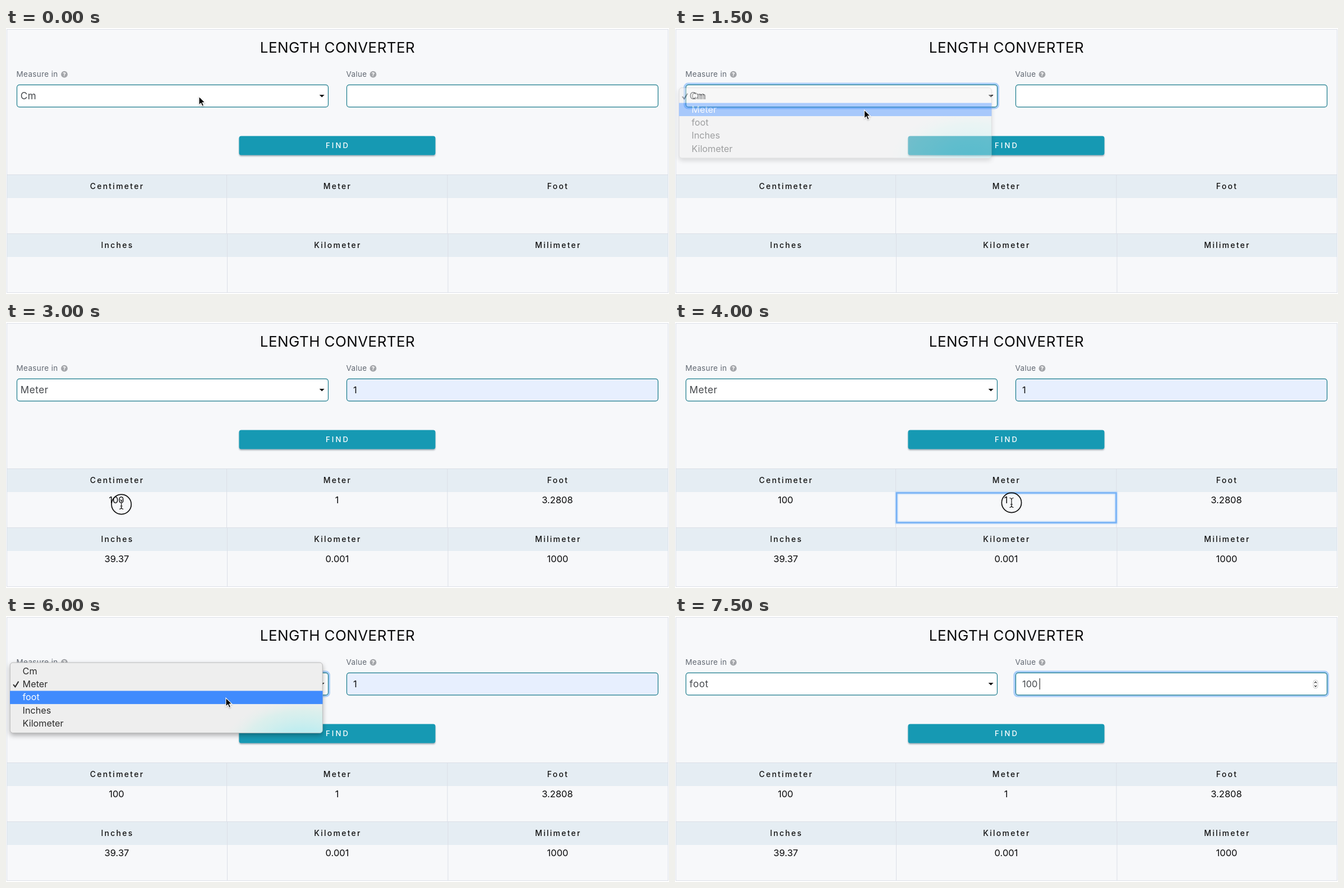
Animation of 1182x474 px, one loop 8 s. Source, as an HTML page:

```html
<!DOCTYPE html>
<html lang="en">
<head>
<meta charset="utf-8">
<title>Length converter</title>
<style>
  html, body { margin: 0; width: 100%; height: 100%; overflow: hidden; background: #fff; }
  svg { display: block; width: 100%; height: 100%; font-family: Inter, "Open Sans", sans-serif; }
  .title { font-size: 26px; letter-spacing: .4px; fill: #0b0b0c; }
  .label { font-size: 13.5px; letter-spacing: .35px; fill: #626973; }
  .help { font-size: 9.5px; font-weight: 800; fill: #fff; }
  .field { font-size: 17px; letter-spacing: .6px; fill: #45484c; }
  .number { font-size: 16.5px; fill: #45484c; }
  .dark { fill: #0b0b0c; }
  .find { font-size: 13.2px; font-weight: 500; letter-spacing: 3px; fill: #fff; }
  .head { font-size: 14px; font-weight: 500; letter-spacing: 2.25px; fill: #111; }
  .item { font-size: 16.2px; fill: #2b2b2b; }
  .hot { fill: #fff; }
  .mid { text-anchor: middle; }
  .line { stroke: #dbdfe7; fill: none; }
  .box { stroke: #17798a; stroke-width: 1.2; }
  .ring { fill: none; stroke: #abcff9; stroke-width: 3.6; }
</style>
</head>
<body>
<svg viewBox="0 0 1182 474" preserveAspectRatio="none">
  <defs>
    <radialGradient id="tint" gradientUnits="userSpaceOnUse" cx="0" cy="0" r="1"
      gradientTransform="translate(530 238) scale(146 92)">
      <stop offset="0" stop-color="#aeeaf2"/>
      <stop offset=".4" stop-color="#bcedf0" stop-opacity=".9"/>
      <stop offset=".75" stop-color="#d2f0ec" stop-opacity=".65"/>
      <stop offset="1" stop-color="#e6efed" stop-opacity="0"/>
    </radialGradient>
    <filter id="menuShadow" x="-5%" y="-10%" width="110%" height="130%">
      <feDropShadow dx="0" dy="4" stdDeviation="4" flood-color="#000" flood-opacity=".3"/>
    </filter>
    <filter id="buttonShadow" x="-5%" y="-20%" width="110%" height="150%">
      <feDropShadow dx="0" dy="2" stdDeviation="1.3" flood-color="#20354a" flood-opacity=".4"/>
    </filter>
    <filter id="cursorShadow" x="-50%" y="-50%" width="200%" height="200%">
      <feDropShadow dx="0" dy="1" stdDeviation=".8" flood-color="#000" flood-opacity=".3"/>
    </filter>
    <filter id="soft" x="-5%" y="-20%" width="110%" height="140%">
      <feGaussianBlur stdDeviation="1"/>
    </filter>
  </defs>
  <g id="page"></g>
  <g id="live"></g>
</svg>
<script>
const page = document.getElementById('page');
const live = document.getElementById('live');
const STEP = 500;
const UNITS = ['Cm', 'Meter', 'foot', 'Inches', 'Kilometer'];
const HEADS = [['Centimeter', 'Meter', 'Foot'], ['Inches', 'Kilometer', 'Milimeter']];
const RESULTS = [['100', '1', '3.2808'], ['39.37', '0.001', '1000']];
const CENTERS = [197, 590, 983];
const CELL_EDGES = [1.5, 394, 787.5, 1180.5];

const text = (x, y, cls, str) => `<text x="${x}" y="${y}" class="${cls}">${str}</text>`;
const rect = (x, y, w, h, attrs) => `<rect x="${x}" y="${y}" width="${w}" height="${h}" ${attrs}/>`;
const path = (d, attrs) => `<path d="${d}" ${attrs}/>`;
const grid = (rows, draw) => rows.map((row, r) => row.map((s, c) => draw(s, c, r)).join('')).join('');

const help = x => `<circle cx="${x}" cy="82.7" r="5.9" fill="#a3a5a9"/>` + text(x, 86.2, 'help mid', '?');

function drawPage() {
  const bands = [261, 366].map((y, r) =>
    rect(2, y, 1178, 42, 'fill="#e5edf3"') +
    path(`M2 ${y + .5}H1180M${393.5 + r} ${y}V${y + 105}M${787 + r} ${y}V${y + 105}`, 'class="line"'));
  return rect(1.5, 2.5, 1179, 469, 'fill="#f7f8fa"') + bands.join('') +
    rect(1.5, 2.5, 1179, 469, 'class="line"') +
    text(591, 44, 'title mid', 'LENGTH CONVERTER') +
    text(18.5, 87.3, 'label', 'Measure in') + help(104) +
    text(606.5, 87.3, 'label', 'Value') + help(654.5) +
    rect(415.5, 192.5, 350, 34, 'rx="4" fill="#1599b3" filter="url(#buttonShadow)"') +
    text(591.5, 214, 'find mid', 'FIND') +
    grid(HEADS, (s, c, r) => text(CENTERS[c] + 1 + r * .5, 287.2 + 105 * r, 'head mid', s));
}

const input = (x, fill, focused) =>
  (focused ? rect(x - 1.8, 99.4, 559, 43.4, 'rx="6" class="ring"') : '') +
  rect(x + .5, 101.4, 555, 39.4, `rx="4.5" class="box" fill="${fill}"`);

function drawFields({ unit, focus, value, auto, caret, spin }) {
  let out = input(19, '#fff', focus === 'unit') + text(25.8, 126.8, 'field', unit) +
    path('M558.7 119h9l-4.5 4.6z', 'fill="#111"') +
    input(607, auto ? '#e7effe' : '#fff', focus === 'value');
  if (value) out += text(619, 126.8, 'number' + (auto ? ' dark' : ''), value);
  if (caret) out += path(`M${caret} 111V131`, 'stroke="#333" stroke-width="1.2"');
  if (spin) {
    out += rect(1138, 114, 8, 15, 'rx="4" fill="#fff" stroke="#bbb" stroke-width=".8"') +
      path('M1140 119.5l2-2.3 2 2.3M1140 123.7l2 2.3 2-2.3', 'fill="none" stroke="#333" stroke-width="1.2"');
  }
  return out;
}

function drawCellFocus(cell) {
  const x = CELL_EDGES[cell] + 1, w = CELL_EDGES[cell + 1] - CELL_EDGES[cell] - 2;
  return rect(x, 304.5, w, 53, 'fill="none" stroke="#a6cdfa" stroke-width="4" filter="url(#soft)"') +
    rect(x, 304.5, w, 53, 'fill="none" stroke="#76b1f6" stroke-width="2.4"');
}

function drawMenu({ top, checked, hot, alpha = 1 }) {
  const frame = 'rx="5" ';
  const rowTop = i => top + 3.7 + i * 23.35;
  const items = UNITS.map((u, i) => text(29.6, rowTop(i) + 17, 'item' + (i === hot ? ' hot' : ''), u));
  const tick = path(`M13 ${rowTop(checked) + 12}l3.4 4.2 6-9.6`,
    `fill="none" stroke-width="2" stroke="${checked === hot ? '#fff' : '#2b2b2b'}"`);
  return `<g opacity="${alpha}">` +
    rect(7.3, top, 557, 125.4, frame + 'fill="#eee" stroke="#a9a9a9" stroke-width=".8" filter="url(#menuShadow)"') +
    rect(7.5, top + .3, 556.6, 124.8, frame + 'fill="url(#tint)"') +
    rect(7, rowTop(hot), 557.5, 23.5, 'fill="#408bfd"') + items.join('') + tick + '</g>';
}

const BEAM = 'M-3.6-8.5Q-.4-8.5 0-5.5Q.4-8.5 3.6-8.5M0-6V6M-3.6 8.5Q-.4 8.5 0 5.5Q.4 8.5 3.6 8.5M-2 3H2';
const beam = path(BEAM, 'fill="none" stroke="#fff" stroke-width="2.6" opacity=".7"') +
  path(BEAM, 'fill="none" stroke="#111" stroke-width="1.2"');
const CURSORS = {
  arrow: path('M0 0V15.2L3.6 11.9L6 17.4L8.6 16.3L6.2 10.9H11z',
    'fill="#000" stroke="#fff" stroke-width="1.1" filter="url(#cursorShadow)"'),
  hand: path('M-2 1Q0-1.5 2 1V7Q5 5.6 5.6 7.6Q8.4 6.6 8.8 8.8Q11.4 8.4 11.2 11L9.6 18H-1.5L-6.5 11Q-6-.5+9 8.4-2 11z'.replace('-.5+9 8.4', '8'),
    'fill="#fff" stroke="#000" stroke-width="1.1" filter="url(#cursorShadow)"'),
  beam,
  press: '<circle r="17.6" fill="none" stroke="#111" stroke-width="1.7"/>' + beam
};

const firstMenu = { top: 106.5, checked: 0, hot: 0 };
const secondMenu = { top: 83, checked: 1, hot: 2 };

// One entry per step; each entry overrides the state before it.
const CHANGES = [
  { unit: 'Cm', cursor: ['arrow', 344, 122] },
  { focus: 'unit', menu: firstMenu },
  { menu: { ...firstMenu, hot: 1 }, cursor: ['arrow', 337.5, 146] },
  { menu: { ...firstMenu, hot: 1, alpha: .43 } },
  { unit: 'Meter', focus: null, menu: null, value: '1', auto: true, cursor: ['hand', 640, 207] },
  { results: true },
  { cursor: ['press', 205.7, 325] },
  { cell: 0, cursor: ['beam', 206, 325] },
  { cell: 1, cursor: ['press', 600, 322] },
  { cursor: ['beam', 606, 322] },
  { cell: 2, cursor: ['press', 988, 317] },
  { cursor: ['beam', 1066, 333] },
  { cell: null, focus: 'unit', menu: secondMenu, cursor: ['arrow', 392, 146] },
  { unit: 'foot', menu: null, focus: 'value', caret: 627, spin: true, cursor: ['beam', 720, 122] },
  { value: '10', auto: false, caret: 639, cursor: null },
  { value: '100', caret: 650.3 }
];
const STATES = [];
CHANGES.forEach((change, i) => STATES.push({ ...STATES[i - 1], ...change }));

function drawState(s) {
  let out = drawFields(s);
  if (s.results) out += grid(RESULTS, (v, c, r) => text(CENTERS[c] + r * .5, 323.2 + 105 * r, 'number dark mid', v));
  if (s.cell != null) out += drawCellFocus(s.cell);
  if (s.menu) out += drawMenu(s.menu);
  if (s.cursor) {
    const [kind, x, y] = s.cursor;
    out += `<g transform="translate(${x} ${y})">${CURSORS[kind]}</g>`;
  }
  return out;
}

let shown = -1;
function tick() {
  const index = Math.floor(performance.now() / STEP) % STATES.length;
  if (index !== shown) {
    shown = index;
    live.innerHTML = drawState(STATES[index]);
  }
  requestAnimationFrame(tick);
}

page.innerHTML = drawPage();
tick();
</script>
</body>
</html>
```
